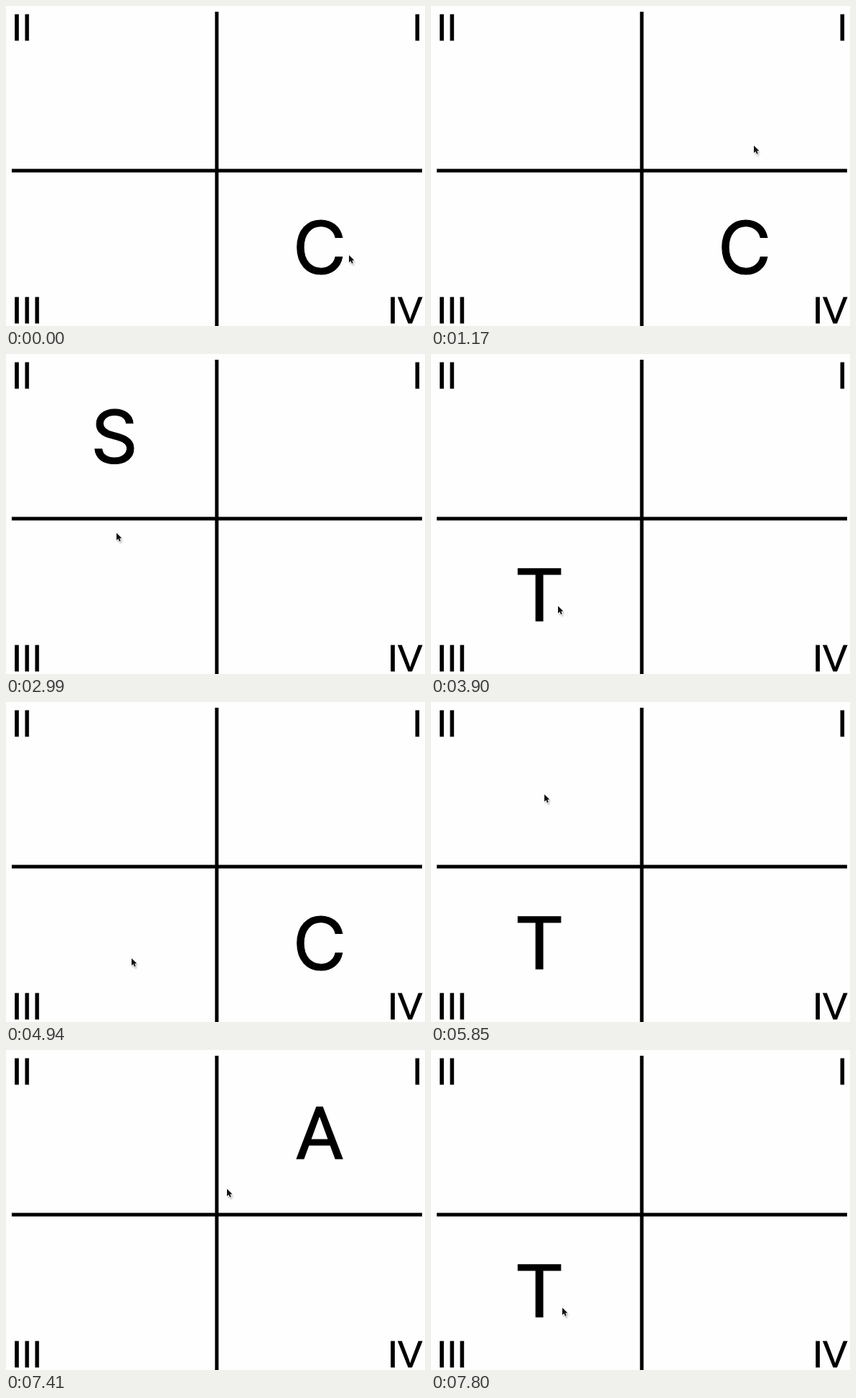
Animation, 584 px wide and 447 px high, one loop 8000 ms. Source, as an HTML page:

```html
<!DOCTYPE html>
<html lang="en">
<head>
<meta charset="utf-8">
<title>Quadrants</title>
<style>
  html, body { margin: 0; width: 100%; height: 100%; overflow: hidden; background: #fefefe; }
  svg { display: block; width: 100vw; height: 100vh; }
  text { font-family: "Liberation Sans", Arial, sans-serif; stroke: #000; stroke-width: .8; }
  .label { font-size: 51px; }
  .letter { font-size: 105px; text-anchor: middle; }
  .letter text { stroke-width: 1.2; }
  #A { font-family: Roboto, sans-serif; font-size: 102px; }
  #S, #C { font-family: Inter, sans-serif; font-size: 102px; }
  .soft { filter: blur(.4px); }
</style>
</head>
<body>
<svg viewBox="0 0 584 447">
  <defs>
    <filter id="blur" x="-100%" y="-100%" width="300%" height="300%">
      <feGaussianBlur stdDeviation="1.2"/>
    </filter>
    <path id="arrow" d="M0 0V10.2L2.4 8.1L4 11.7L5.8 10.9L4.3 7.5L7.4 7.2Z"/>
  </defs>
  <g class="soft">
    <path d="M293.8 8V450M8 230H580" stroke="#000" stroke-width="5"/>
    <g class="label">
      <text x="566.3" y="48.3">I</text>
      <text x="8" y="48.3">II</text>
      <text x="8" y="442.6">III</text>
      <text x="532" y="442.6">IV</text>
    </g>
    <g class="letter">
      <text id="A" x="437" y="151.5">A</text>
      <text id="S" x="151" y="152">S</text>
      <text id="T" x="151" y="373">T</text>
      <text id="C" x="437" y="374">C</text>
    </g>
  </g>
  <g id="cursor">
    <use href="#arrow" x="1.5" y="3" fill="#777" opacity=".6" filter="url(#blur)"/>
    <use href="#arrow" fill="#111" stroke="#fff" stroke-width="1.6" paint-order="stroke"/>
  </g>
</svg>
<script>
  const LOOP = 8000;

  // Each pose holds until the next: start time, letter, cursor tip.
  const poses = [
    [0, "C", 478, 348],
    [1170, "C", 450, 195],
    [1300, "A", 416, 66],
    [1820, "A", 415, 68],
    [1950, "A", 413, 72],
    [2080, "S", 156, 112],
    [2990, "S", 154, 250],
    [3120, "T", 148, 344],
    [3900, "T", 177, 352],
    [4030, "T", 409, 353],
    [4290, "C", 473, 352],
    [4810, "C", 320, 356],
    [4940, "C", 175, 358],
    [5070, "T", 174, 357],
    [5850, "T", 158, 129],
    [5980, "S", 158, 64],
    [6110, "S", 160, 43],
    [6630, "S", 245, 62],
    [6760, "A", 385, 92],
    [6890, "A", 416, 104],
    [7410, "A", 308, 194],
    [7540, "A", 212, 320],
    [7670, "T", 187, 355],
    [7800, "T", 183, 360]
  ];

  const byId = id => document.getElementById(id);
  const letters = ["A", "S", "T", "C"].map(byId);
  const cursor = byId("cursor");

  function draw(time) {
    const [, shown, x, y] = poses.findLast(([start]) => start <= time);
    for (const letter of letters) {
      letter.setAttribute("visibility", letter.id === shown ? "visible" : "hidden");
    }
    cursor.setAttribute("transform", `translate(${x} ${y})`);
  }

  const begin = performance.now();
  function tick() {
    draw((performance.now() - begin) % LOOP);
    requestAnimationFrame(tick);
  }
  tick();
</script>
</body>
</html>
```
